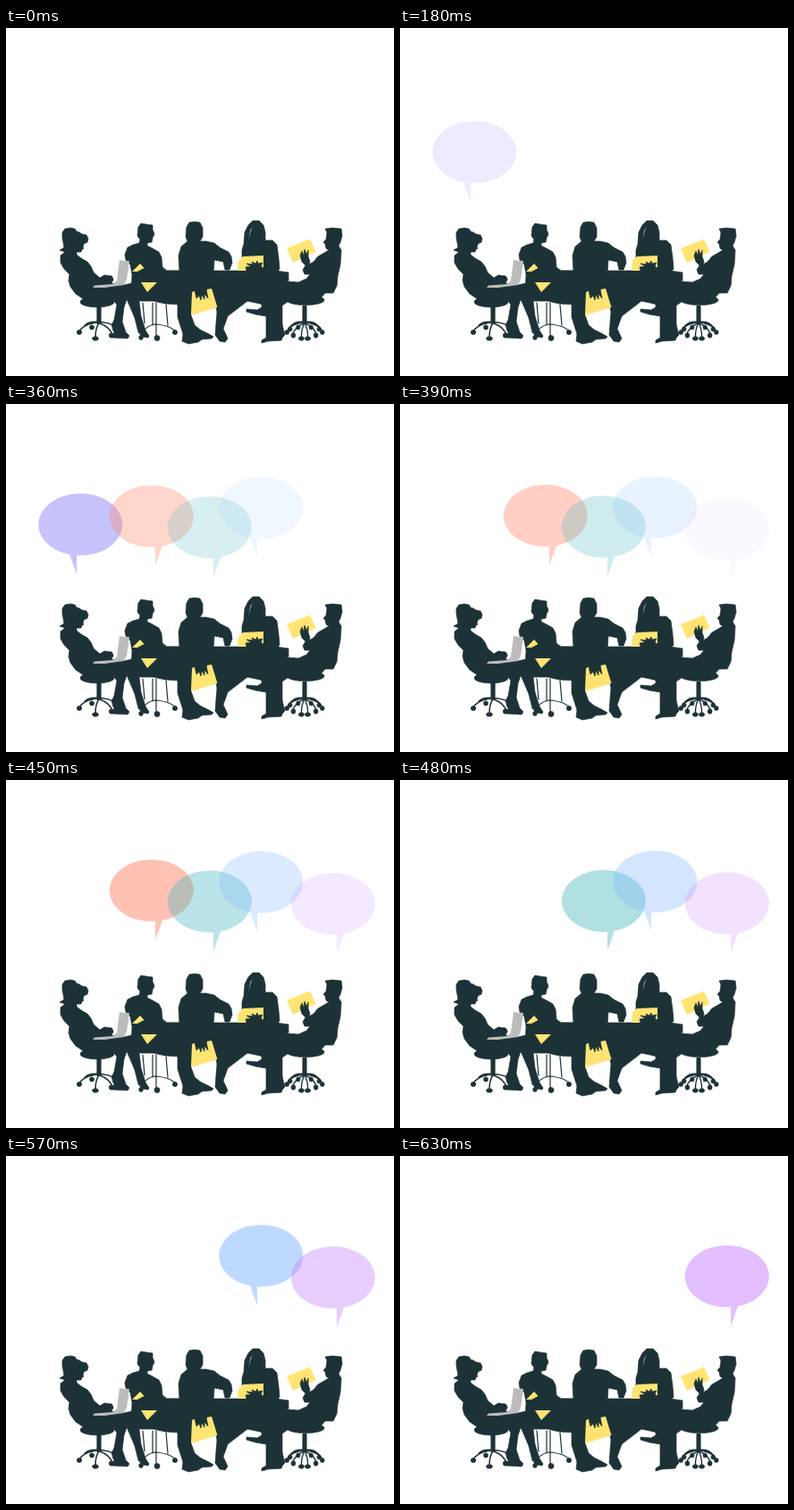
Write an HTML page that moves like this. It is 434 by 390 pixels and loops after 0.66 s.

```html
<!DOCTYPE html>
<html lang="en">
<head>
<meta charset="utf-8">
<title>Meeting</title>
<style>
html, body { margin: 0; width: 100%; height: 100%; overflow: hidden; background: #fff; }
svg { display: block; }
.ink { fill: #1d3237; stroke: #1d3237; stroke-width: .7; stroke-linejoin: round; }
.line { fill: none; stroke: #1d3237; stroke-width: 1.5; stroke-linecap: round; stroke-linejoin: round; }
.thin { stroke-width: 1.2; }
.paper { fill: #ffe473; }
</style>
</head>
<body>
<svg width="434" height="390" viewBox="0 0 434 390">
  <defs>
    <g id="base">
      <path class="ink" d="M-2.200-19H2.200V1H-2.200Z"/>
      <path class="line" d="M-22 10Q-19 2 0-1Q17 0 20 7M0 0Q-4 6-4 16M0 0Q13 5 15 14M0-1Q-12-2-16 3"/>
      <g class="ink">
        <ellipse cx="-22" cy="10.500" rx="2.700" ry="2.500"/>
        <ellipse cx="-4" cy="17.500" rx="3.400" ry="2.200"/>
        <ellipse cx="14" cy="14" rx="2.700" ry="2.700"/>
        <ellipse cx="18" cy="7" rx="2.500" ry="2.500"/>
        <ellipse cx="-8" cy="5" rx="2.500" ry="2.500"/>
      </g>
    </g>
  </defs>

  <g id="bubbles"></g>

  <!-- chairs -->
  <use href="#base" x="104" y="330.500"/>
  <use href="#base" transform="translate(334 330.500) scale(-.9 1)"/>
  <use href="#base" transform="translate(334 330.500) scale(.9 1)"/>
  <ellipse class="ink" cx="335" cy="305" rx="21" ry="5.500"/>
  <ellipse class="ink" cx="102" cy="307" rx="19" ry="6"/>
  <path class="line thin" d="M153 308L155 331M164 308V333M168 308V346M179 310L181 333M150 346Q155 334 166 332Q184 333 189 340"/>
  <g class="ink">
    <circle cx="169" cy="347.500" r="3"/><circle cx="189" cy="341" r="2.600"/><circle cx="151" cy="347" r="2.400"/>
  </g>

  <!-- man, second from left -->
  <path class="ink" d="M148 223L151 219L157 220L164 221L164 226L166 231L164 235L163 240L158 241L158 244L164 247L171 251L174 257L175 268L180 272H196V310L178 309L165 306L150 306L140 299L141 276L139 265L134 260L133 254L136 246L142 243L149 241L150 237L147 233Z"/>
  <path class="paper" d="M150 264L154.500 269L147 273H141ZM151 285H169L158 296Z"/>

  <!-- woman with laptop -->
  <path class="ink" d="M63 235L63 229L66 225L72 224L77 225L79 228L82 229L85 231L90 232L92 236L91 240L87 242L86 246L87 247L85 248L84 251L79 251L79 254L84 258L91 262L95 267L98 274L105 280L110 277L118 278L120 282L118 286L123 288L132 288L141 286L147 290L153 298L149 306L151 323L156 339L160 345L159 347L153 346L148 341L144 325L139 313L135 304L132 313L130 329L134 341L138 345L136 348L119 347L121 341L118 333L121 327L124 310L120 305L100 306L87 304L78 298L72 290L70 283L71 276L65 270L61 263L61 255L66 251L63 250L60 249L65 246Z"/>
  <path d="M127 260L138 261L135 282L132 288L110 291H97L99 288.500L120 287L124 283Z" fill="#bcbcbc"/>
  <path class="ink" d="M101 286L106 280L111 277L113 279L118 278L120 281L118 284L111 286Z"/>

  <!-- table -->
  <path class="ink" d="M170 272H302L316 274V283L311 285L306 302L296 313L284 309L270 306L248 323L243 337L248 348L245 352L239 351L234 344L236 318L230 292H191L170 286Z"/>

  <!-- man in the centre -->
  <path class="ink" d="M202 223L205 218L211 217L217 218L220 224L220 234L217 239L224 239L233 241L239 246L249 251L252 256L253 263L250 271L245 271L243 262L233 260L232 274L231 292L209 295L207 322L211 333L217 338L227 343L232 346L230 348L219 349L215 352L204 354L197 351L198 343L192 324L192 309L190 291L194 273L193 255L196 245L203 239L201 234Z"/>
  <path class="paper" d="M208 296L230 292L236.500 313L207 322Z"/>
  <path class="ink" d="M211 294L224 292L225 298L226 303L222 298L222 304L219 299L218 305L216 300L213 303Z"/>

  <!-- woman on the right -->
  <path class="ink" d="M266 242L267 229L271 221L276 216L283 216L288 221L290 229L290 238L298 238L303 243L305 258L306 270L302 275H266L264 257L264 249Z"/>
  <path class="paper" d="M259 272L260 261L265 256L288 255V272Z"/>
  <path class="ink" d="M269 272L268 268L274 267L269 264L276 265L275 262L279 264L281 261L282 264L287 263L285 267L288 269V273Z"/>
  <path d="M271 238L273 227L276 222L273 231Z" fill="#8d989a"/>
  <path class="ink" d="M269 315L281 316L286 313V303H306V318L309 333L310 345L308 350L293 351L286 353V350L291 347L291 323L279 321L269 318Z"/>

  <!-- man on the far right -->
  <path class="paper" d="M314 247L340 236.500L346.500 251L321 263Z"/>
  <path class="ink" d="M357 225L365 224L375 225L376 233L374 240L372 244L375 249L374 265L371 278L370 289L366 297L357 297L351 304L342 307L319 304L309 311L309 333L312 344L306 350L293 349L293 339L294 319L289 298L302 282L315 284L327 285L336 281L340 276L334 276L332 271L335 266L331 262L329 255L331 250L333 255L334 248L336 254L338 249L338 256L340 262L339 265L344 262L349 256L356 252L361 249L358 247L357 242L355 240L358 237L359 229Z"/>
</svg>
<script>
const LOOP = 660, STEP = 30, HOLD = 180, FADE = 270, RISE = 6;
const SHAPE = "M4 34.6A47 34.7 0 1 1 12 33.55L4 55.5Z";

// centre, colour, time of full strength, tail side
const bubbles = [
  { x: 83, y: 135, fill: "#8d88fb", end: 360, side: -1 },
  { x: 163, y: 123.8, fill: "#ff8464", end: 450, side: 1 },
  { x: 228, y: 134.8, fill: "#4fb9c1", end: 510, side: 1 },
  { x: 285, y: 111.8, fill: "#7fb3ff", end: 570, side: -1 },
  { x: 366, y: 134.8, fill: "#c57fff", end: 630, side: 1 }
];

const layer = document.getElementById("bubbles");
for (const b of bubbles) {
  b.node = document.createElementNS("http://www.w3.org/2000/svg", "path");
  b.node.setAttribute("d", SHAPE);
  b.node.setAttribute("fill", b.fill);
  layer.append(b.node);
}

function draw(ms) {
  const t = Math.floor((ms % LOOP) / STEP) * STEP;
  for (const b of bubbles) {
    const p = 1 - (b.end - t) / FADE;
    const shown = t >= HOLD && p > 0 && t <= b.end;
    b.node.setAttribute("fill-opacity", shown ? p / 2 : 0);
    b.node.setAttribute("transform",
      `translate(${b.x} ${b.y + (1 - p) * RISE}) scale(${b.side} 1)`);
  }
}

function tick() {
  draw(performance.now());
  requestAnimationFrame(tick);
}
tick();
</script>
</body>
</html>
```
